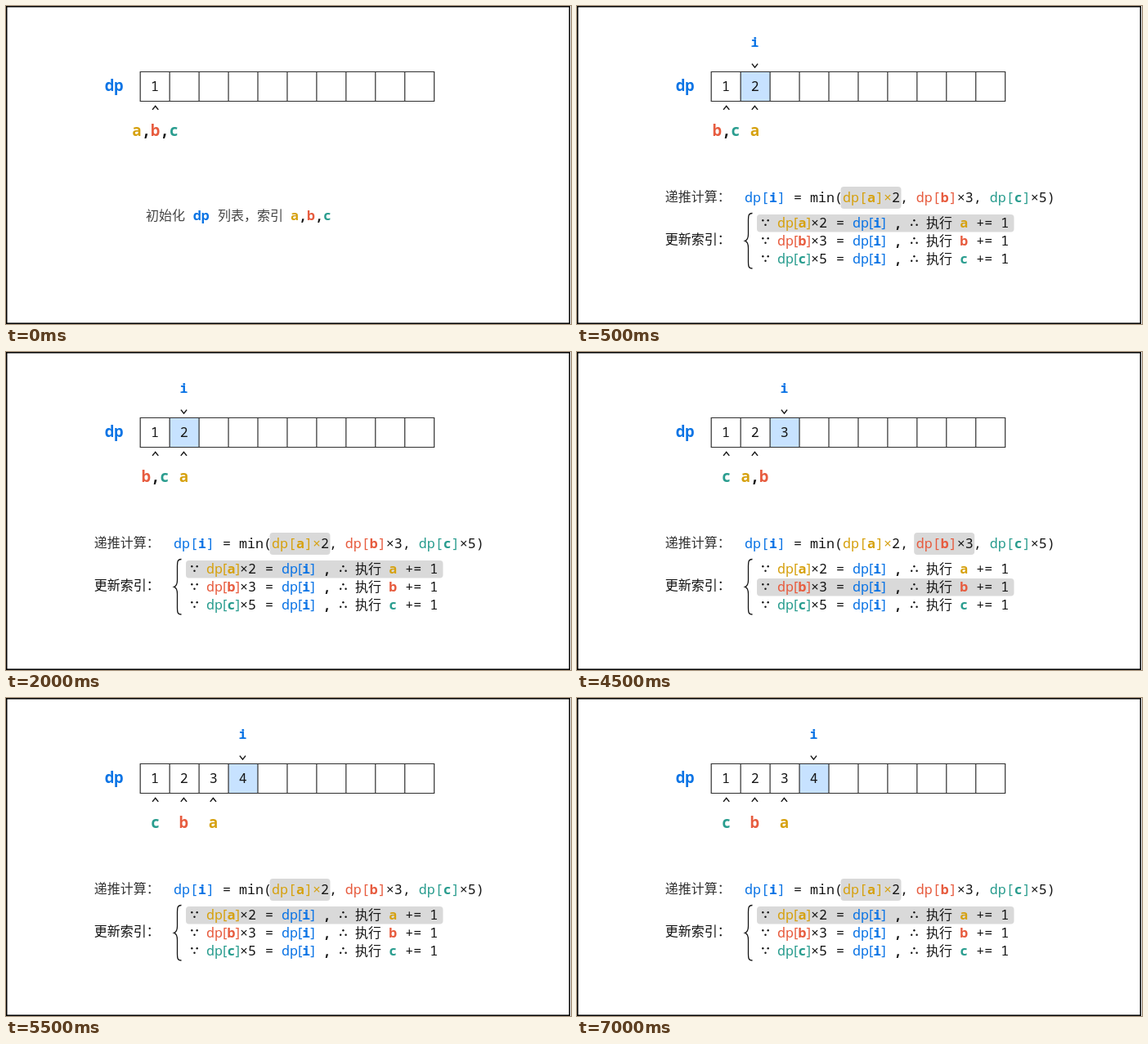
An HTML page that plays this animation: 691 by 389 pixels, repeating every 8 s.

```html
<!DOCTYPE html>
<html lang="zh-CN">
<head>
<meta charset="utf-8">
<style>
  html, body { margin: 0; width: 100%; height: 100%; overflow: hidden; background: #fff; }
  svg { display: block; width: 100vw; height: 100vh; }
  text { font: 16.65px "Noto Sans Mono", "Noto Sans CJK SC", monospace; white-space: pre; }
  .zh { font: 16px "Noto Sans CJK SC", "Noto Sans CJK", sans-serif; }
  .thin { font-family: "Noto Sans", sans-serif; }
  .big { font-size: 18.9px; font-weight: 700; }
  .bold { font-weight: 700; }
  .mid { text-anchor: middle; }
</style>
</head>
<body>
<svg id="stage" viewBox="0 0 691 389" preserveAspectRatio="none"></svg>
<script>
const LOOP = 8000;
const INK = '#161616';
const COLORS = { a: '#d6a10f', b: '#e75c3f', c: '#2a9d8f', i: '#0b74e5', k: INK };
const CELL = 35.95, LEFT = 164.2, TOP = 80.5;
const STEPS = [
  { at: 0, count: 1, pointers: ['a,b,c'] },
  { at: 500, count: 2, pointers: ['b,c', 'a'], pick: 0 },
  { at: 3000, count: 3, pointers: ['c', 'a,b'], pick: 1 },
  { at: 5500, count: 4, pointers: ['c', 'b', 'a'], pick: 0 }
];
const TERMS = [['a', 2], ['b', 3], ['c', 5]];
const stage = document.getElementById('stage');

const tag = (name, attrs, body = '') =>
  `<${name} ${Object.entries(attrs).map(([k, v]) => `${k}="${v}"`).join(' ')}>${body}</${name}>`;
const span = (s, color = 'k', cls = '') => tag('tspan', { fill: COLORS[color], class: cls }, s);
const text = (x, y, body, cls = '', fill = INK) => tag('text', { x, y, class: cls, fill }, body);
const line = (d, width = 1.2, stroke = INK) =>
  tag('path', { d, fill: 'none', stroke, 'stroke-width': width });
const box = (x, y, width, height) => tag('rect', { x, y, width, height, rx: 4, fill: '#d9d9d9' });
const center = n => LEFT + CELL * (n + 0.5);

// Colours each index letter and leaves the commas dark.
const letters = s => [...s].map(ch => span(ch, COLORS[ch] ? ch : 'k', 'bold')).join('');

// dp[x] with a bold index
function entry(index, cls = '') {
  return span('dp', index) + span('[', index, cls) + span(index, index, 'bold') + span(']', index, cls);
}

// Three dots in a triangle; dir is 1 for "because", -1 for "therefore".
function dots(x, y, dir) {
  return [[-3.2, -2.8], [3.2, -2.8], [0, 2.8]]
    .map(([dx, dy]) => tag('circle', { cx: x + dx, cy: y + dy * dir, r: 1.2, fill: INK })).join('');
}

function table(step) {
  const now = step.count - 1;
  let out = text(120.8, 104.3, span('dp', 'i'), 'big');
  if (now) {
    out += tag('rect', { x: LEFT + CELL * now, y: TOP, width: CELL, height: 36, fill: '#c7e2ff' });
    out += text(center(now) - 0.6, 50, span('i', 'i'), 'bold mid');
    out += line(`M${center(now) - 4.2} 70.6l3.6 4.5 3.6-4.5`, 1.5);
  }
  let d = `M${LEFT} ${TOP}h${CELL * 10}v36h${-CELL * 10}z`;
  for (let n = 1; n < 10; n++) d += `M${LEFT + CELL * n} ${TOP}v36`;
  out += line(d, 1.2, '#303030');
  for (let n = 0; n < step.count; n++) out += text(center(n) - 0.3, 104, n + 1, 'mid');
  step.pointers.forEach((s, n) => {
    const x = center(n) + (n ? -0.7 : 0.5);
    out += line(`M${x - 3.6} 126.9l3.6-4.5 3.6 4.5`, 1.5);
    out += text(x, 159.2, letters(s), 'big mid');
  });
  return out;
}

function intro() {
  return text(171, 261.8, '初始化', 'zh', '#444') +
    text(228.8, 261.8, span('dp', 'i', 'bold')) +
    text(259, 261.8, '列表，索引', 'zh', '#444') +
    text(348, 261.8, letters('a,b,c'));
}

function rules(pick) {
  let out = box(322.5 + pick * 89.7, 221, 74, 27) + box(220, 255 + pick * 22, 314.5, 21.5);
  out += text(107.7, 239.2, '递推计算：', 'zh', '#333') + text(107.7, 291.2, '更新索引：', 'zh', '#111');
  const args = TERMS.map(([v, f]) => entry(v) + span('×', v === 'a' ? 'a' : 'k') + span(f)).join(', ');
  out += text(205, 239.5, entry('i') + ' = min(' + args + ')');
  out += line('M214.5 253.5C209 253.5 209.5 258 209.5 264V279Q209.5 286 205.5 287.3Q209.5 288.6 209.5 296V311C209.5 317 209 321 214.5 321', 1.3);
  TERMS.forEach(([v, f], n) => {
    const y = 271 + n * 22;
    out += dots(230.5, y - 6, 1) + dots(412.4, y - 6, -1);
    out += text(245.1, y, entry(v, 'thin') + `×${f}`);
    out += text(317, y, '=') + text(336.9, y, entry('i', 'thin')) + text(387.6, y, ',', 'bold');
    out += text(427, y, '执行', 'zh') + text(468.3, y, letters(v) + ' += 1');
  });
  return out;
}

function draw(step) {
  stage.innerHTML = tag('rect', { x: 0, y: 0, width: 691, height: 389, fill: '#fff' }) +
    table(step) + (step.count > 1 ? rules(step.pick) : intro()) +
    tag('rect', { x: 0.75, y: 0.75, width: 688.5, height: 387.5, fill: 'none', stroke: '#000', 'stroke-width': 1.5 });
}

let shown;
function tick() {
  const t = performance.now() % LOOP;
  const step = STEPS.filter(s => s.at <= t).pop();
  if (step !== shown) draw(shown = step);
  requestAnimationFrame(tick);
}
tick();
</script>
</body>
</html>
```
